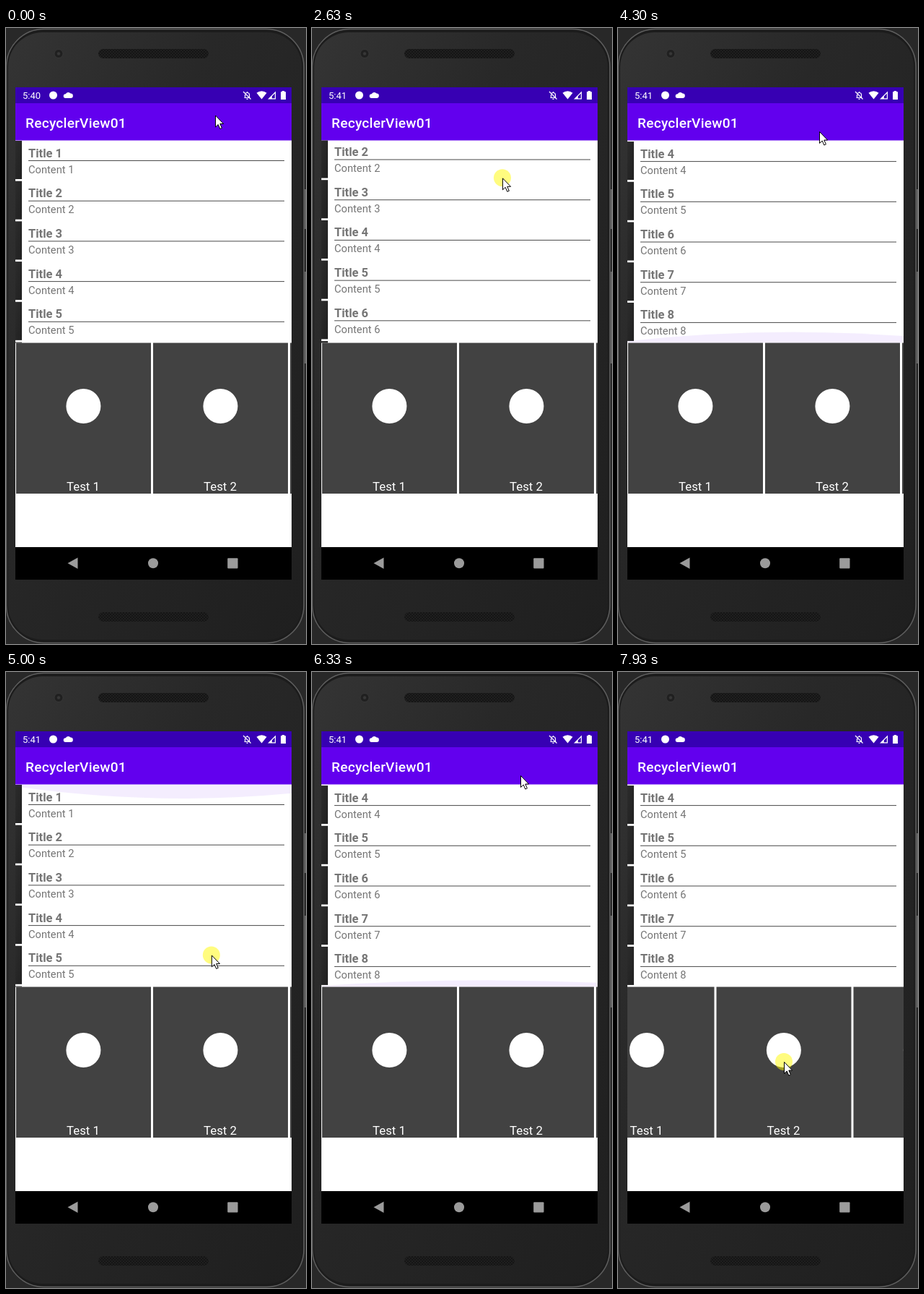
Animation, 416 px wide and 852 px high, one loop 8000 ms. Source, as an HTML page:

```html
<!DOCTYPE html>
<html lang="en">
<head>
<meta charset="utf-8">
<title>RecyclerView01</title>
<style>
html, body { margin: 0; width: 100%; height: 100%; overflow: hidden; background: #282828; }
svg { display: block; width: 416px; height: 852px; font-family: Roboto, "Noto Sans", sans-serif; }
.title { font-size: 16.5px; font-weight: 700; fill: #757575; }
.content { font-size: 14.7px; fill: #757575; }
.label { font-size: 16.8px; fill: #fff; text-anchor: middle; }
.bar { font-size: 19.1px; font-weight: 500; letter-spacing: .0125em; fill: #fff; }
.clock { font-size: 13px; fill: #fff; }
</style>
</head>
<body>
<svg viewBox="0 0 416 852">
  <defs>
    <linearGradient id="body" x2="1" y2="1">
      <stop offset="0" stop-color="#343434"/>
      <stop offset=".35" stop-color="#282828"/>
      <stop offset="1" stop-color="#1f1f1f"/>
    </linearGradient>
    <linearGradient id="edge" x2="1" y2="1">
      <stop offset="0" stop-color="#2c2c2c"/>
      <stop offset="1" stop-color="#202020"/>
    </linearGradient>
    <pattern id="mesh" width="4" height="4" patternUnits="userSpaceOnUse">
      <rect width="4" height="4" fill="#151515"/>
      <circle cx="1" cy="1" r=".8" fill="#2c2c2c"/>
      <circle cx="3" cy="3" r=".8" fill="#2c2c2c"/>
    </pattern>
    <clipPath id="listClip"><rect x="13" y="155.5" width="383" height="280"/></clipPath>
    <clipPath id="rowClip"><rect x="13" y="435" width="383" height="210"/></clipPath>
  </defs>

  <!-- phone -->
  <rect width="416" height="852" fill="#282828"/>
  <path d="M414 223h2v55h-2zM414 337h2v127h-2z" fill="#666"/>
  <rect x=".5" y="1.5" width="412.5" height="849" rx="52" fill="#1c1c1c" stroke="#5f5f5f" stroke-width="1.5"/>
  <rect x="3" y="6" width="407" height="840" rx="48" fill="url(#body)"/>
  <rect x="128" y="29" width="153" height="13" rx="6.5" fill="url(#mesh)"/>
  <rect x="128" y="808" width="153" height="13" rx="6.5" fill="url(#mesh)"/>
  <circle cx="73" cy="35.5" r="6" fill="#202020" stroke="#383838"/>
  <circle cx="73" cy="35.5" r="2.2" fill="#373737"/>

  <!-- screen -->
  <rect x="13" y="82" width="383" height="681" fill="#fff"/>
  <rect x="13" y="82" width="383" height="22" fill="#3700b3"/>
  <rect x="13" y="104" width="383" height="51.5" fill="#6200ee"/>
  <text class="clock" id="clock" x="23" y="98"></text>
  <text class="bar" x="27" y="137.5">RecyclerView01</text>
  <g fill="#fff">
    <circle cx="65.5" cy="93" r="5.5"/>
    <path d="M82.5 97a2.9 2.9 0 0 1 .2-5.8 4 4 0 0 1 6.9-.6 3.2 3.2 0 0 1 .1 6.4z"/>
    <path d="M354.5 98.5l-7-8.7a11 11 0 0 1 14 0z"/>
    <path d="M374 87.5v11h-11zM372.8 90.5l-4 4v2.8h4z" fill-rule="evenodd"/>
    <path d="M382.7 87h3.4v1.3h1.9v10.7h-7v-10.7h1.7z"/>
    <path d="M330.5 96.5h8M331.5 96v-3.5a3 3 0 0 1 6 0v3.5M334.5 88v1.5M333.5 98.3h2M329 88l10.5 10.5" fill="none" stroke="#fff" stroke-width="1.2"/>
  </g>

  <g clip-path="url(#listClip)">
    <g id="list"></g>
    <path id="topGlow" fill="#6200ee" fill-opacity=".07"/>
    <path id="endGlow" fill="#6200ee" fill-opacity=".07"/>
  </g>
  <g clip-path="url(#rowClip)"><g id="row"></g></g>

  <rect x="13" y="718" width="383" height="45" fill="#000"/>
  <g fill="#9b9b9b">
    <path d="M85.5 740.3l14-7.7v15.4z"/>
    <circle cx="204" cy="740.3" r="7"/>
    <rect x="307.2" y="733.2" width="14.3" height="14.3" rx="1"/>
  </g>

  <g id="mouse">
    <circle id="press" r="12" fill="#fffa00" fill-opacity=".5"/>
    <path d="M.5 .5V16.5L4.2 13 6.8 19 9.4 17.9 6.8 12H11.6Z" fill="#fff" stroke="#000"/>
  </g>
</svg>
<script>
const LOOP = 8000, FRAME = 70, PITCH = 55.7, CARD = 190;
const MAX = 166, SLOP = 8.5, GRIP = 60, FLING = 140, FADE = 380;
const $ = id => document.getElementById(id);
const clamp = (v, lo, hi) => Math.min(hi, Math.max(lo, v));
const ease = p => (p = clamp(p, 0, 1), p * p * (3 - 2 * p));
const mix = (a, b, p) => a + (b - a) * p;

// pointer moves: start, end, x, y, and what is dragged along
const moves = [
  [0, 0, 290, 120.5],
  [850, 1550, 266, 278],
  [1950, 2030, 266, 273],
  [2400, 2900, 261, 113, "list"],
  [2980, 3180, 264, 153],
  [3190, 3490, 272, 345, "list"],
  [3690, 4150, 279, 143, "list"],
  [4440, 4580, 280, 150],
  [4600, 5050, 285, 400, "list"],
  [5120, 5280, 288, 468],
  [5340, 5570, 288, 338],
  [5588, 6068, 289, 143, "list"],
  [6330, 6680, 278, 187],
  [6750, 7380, 330, 531],
  [7540, 7630, 306, 534],
  [7640, 7930, 230, 539, "row"]
].map(([from, to, x, y, drag]) => ({ from, to, x, y, drag }));

const drags = moves.filter(m => m.drag);
const swipes = drags.filter(m => m.drag === "list");

function pointer(t) {
  const i = moves.findLastIndex(m => m.from <= t), b = moves[i], a = moves[i - 1] || b;
  const p = ease((t - b.from) / (b.to - b.from || 1));
  return { x: mix(a.x, b.x, p), y: mix(a.y, b.y, p) };
}

// distance dragged along one axis, less the touch slop
function pulled(m, t, axis) {
  const d = pointer(m.from)[axis] - pointer(clamp(t, m.from, m.to))[axis];
  return Math.sign(d) * Math.max(0, Math.abs(d) - SLOP);
}

// swipes alternate between the two ends of the list
function listState(t) {
  const i = swipes.findLastIndex(m => m.from <= t);
  if (i < 0) return { y: 0, top: 0, end: 0 };
  const m = swipes[i], age = t - m.to - GRIP;
  const raw = (i % 2 ? MAX : 0) + pulled(m, t, "y");
  const fade = 1 - clamp(age / FADE, 0, 1);
  const glow = over => clamp(over / 20, 0, 1) * 19 * fade;
  return {
    y: mix(clamp(raw, 0, MAX), i % 2 ? 0 : MAX, ease(age / FLING)),
    top: glow(-raw),
    end: glow(raw - MAX)
  };
}

function add(parent, tag, attrs, text) {
  const el = document.createElementNS("http://www.w3.org/2000/svg", tag);
  for (const k in attrs) el.setAttribute(k, attrs[k]);
  if (text) el.textContent = text;
  parent.append(el);
}

for (let i = 0; i < 8; i++) {
  const y = 156 + PITCH * i, list = $("list");
  add(list, "rect", { x: 13, y, width: 9, height: 53, fill: "url(#edge)" });
  add(list, "text", { x: 31, y: y + 22.5, class: "title" }, `Title ${i + 1}`);
  add(list, "rect", { x: 31, y: y + 27, width: 355, height: 1, fill: "#4a4a4a" });
  add(list, "text", { x: 31, y: y + 44.5, class: "content" }, `Content ${i + 1}`);
}
for (let i = 0; i < 3; i++) {
  const x = 14 + CARD * i, row = $("row");
  add(row, "rect", { x, y: 435.5, width: 187, height: 208.5, fill: "#424242" });
  add(row, "circle", { cx: x + 93.4, cy: 523, r: 24, fill: "#fff" });
  add(row, "text", { x: x + 93, y: 640, class: "label" }, `Test ${i + 1}`);
}

const arc = (y, h) => `M13 ${y}V${y + h * .15}Q205 ${y + h * 1.6} 396 ${y + h * .65}V${y}Z`;
const shift = (id, x, y) => $(id).setAttribute("transform", `translate(${x} ${y})`);

function draw(t) {
  const { x, y } = pointer(t), list = listState(t);
  const held = drags.some(m => t >= m.from - 30 && t < m.to + GRIP);
  shift("mouse", x, y);
  shift("list", 0, -list.y);
  shift("row", -pulled(drags[drags.length - 1], t, "x"), 0);
  $("press").style.display = held ? "" : "none";
  $("topGlow").setAttribute("d", arc(155.5, list.top));
  $("endGlow").setAttribute("d", arc(435.5, -list.end));
  $("clock").textContent = t < 1200 ? "5:40" : "5:41";
}

const start = performance.now();
function tick() {
  const t = (performance.now() - start) % LOOP;
  draw(Math.max(0, Math.floor((t - 20) / FRAME) * FRAME + 30));
  requestAnimationFrame(tick);
}
tick();
</script>
</body>
</html>
```
